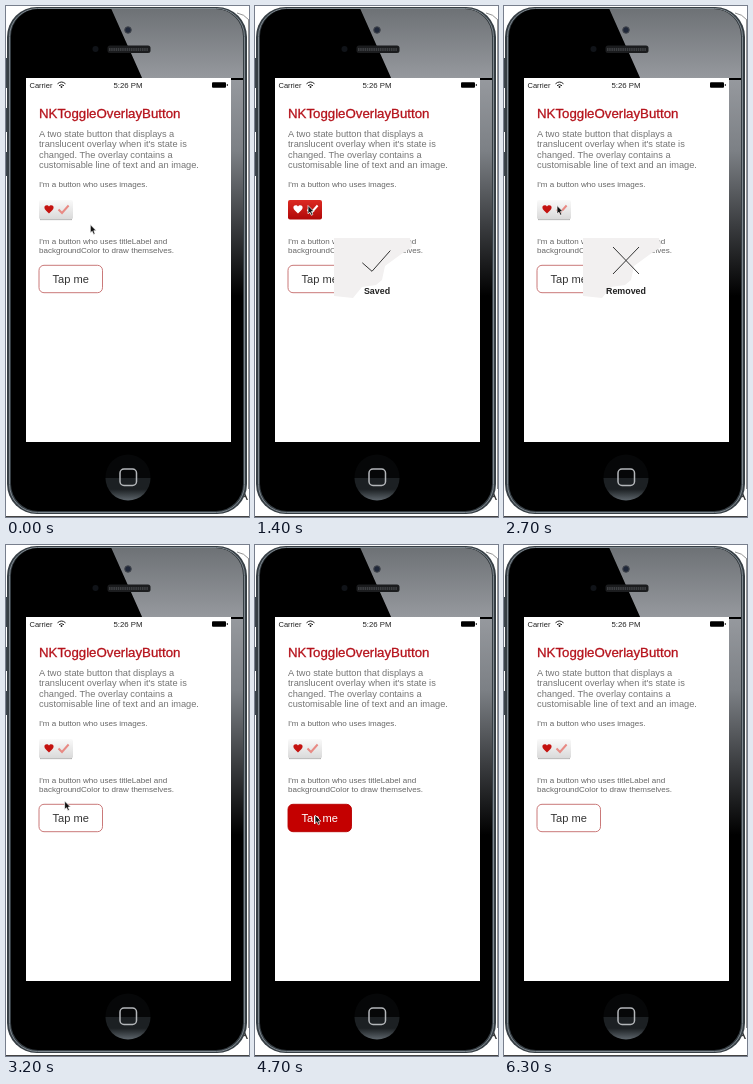
These frames come from a looping animation (243 by 511 pixels, 7300 ms). An HTML page:

```html
<!DOCTYPE html>
<html lang="en">
<head>
<meta charset="utf-8">
<title>Toggle overlay button</title>
<style>
html, body { margin: 0; width: 100%; height: 100%; overflow: hidden; background: #fff; }
svg { display: block; width: 243px; height: 511px; font-family: "Liberation Sans", Arial, sans-serif; }
.status { font-size: 7.5px; fill: #222; }
.title { font-size: 13.25px; fill: #b5121b; stroke: #b5121b; stroke-width: .3px; }
.body { font-size: 9.25px; fill: #747474; }
.note { font-size: 8.05px; fill: #666; }
.tap { font-size: 11.1px; }
.caption { font-size: 8.9px; font-weight: bold; fill: #222; text-anchor: middle; }
.thin { fill: none; stroke: #333; stroke-width: 1; }
.icon { fill: none; stroke-width: 2; }
</style>
</head>
<body>
<svg viewBox="0 0 243 511">
  <defs>
    <linearGradient id="gloss" gradientUnits="userSpaceOnUse" x1="0" y1="0" x2="0" y2="290">
      <stop offset="0" stop-color="#6c7074"/>
      <stop offset=".25" stop-color="#96999e"/>
      <stop offset=".5" stop-color="#7c8085"/>
      <stop offset=".76" stop-color="#3a3c3f"/>
      <stop offset="1" stop-color="#000"/>
    </linearGradient>
    <linearGradient id="home" x2="0" y2="1">
      <stop offset=".5" stop-color="#1c2023"/>
      <stop offset="1" stop-color="#5d656b"/>
    </linearGradient>
    <linearGradient id="plain" x2="0" y2="1">
      <stop offset="0" stop-color="#fafafa"/>
      <stop offset="1" stop-color="#d9d9d9"/>
    </linearGradient>
    <linearGradient id="on" x2="0" y2="1">
      <stop offset="0" stop-color="#dc2a22"/>
      <stop offset="1" stop-color="#b00808"/>
    </linearGradient>
    <linearGradient id="pressed" x2="0" y2="1">
      <stop offset="0" stop-color="#d6d6d6"/>
      <stop offset="1" stop-color="#f6f6f6"/>
    </linearGradient>
    <clipPath id="front"><rect x="5" y="3" width="232" height="502" rx="27"/></clipPath>
  </defs>

  <!-- page edge behind the phone -->
  <path d="M231 7Q238 8 243 14M242.5 14V483" fill="none" stroke="#777" stroke-width=".8"/>
  <text x="232" y="494" font-size="15" fill="#333">A</text>
  <path d="M0 510.5H243" stroke="#444"/>

  <!-- phone -->
  <path d="M1 52V82M1 102V126M1 146V170" stroke="#3d464d" stroke-width="2"/>
  <rect x="1" y="1" width="240" height="507" rx="30" fill="#363e44"/>
  <rect x="3.5" y="2.5" width="235" height="504" rx="28" fill="none" stroke="#7f888f"/>
  <g clip-path="url(#front)">
    <rect width="243" height="511" fill="#000"/>
    <path d="M104 0L137 74H243V0ZM225 72H243V290H225Z" fill="url(#gloss)"/>
  </g>
  <circle cx="122" cy="24" r="3.3" fill="#20283a" stroke="#45494f"/>
  <circle cx="89.5" cy="43" r="3" fill="#101318"/>
  <rect x="101.5" y="39.5" width="43" height="7.5" rx="2.5" fill="#1b1c1e"/>
  <path d="M103 43.5H142" stroke="#3c3e41" stroke-width="3" stroke-dasharray="1.5 .7"/>
  <circle cx="122" cy="471" r="22.5" fill="#060708"/>
  <path d="M99.5 472A22.5 22.5 0 0 0 144.5 472Z" fill="url(#home)"/>
  <rect x="114" y="463" width="16.5" height="16.5" rx="4" fill="none" stroke="#b4b7ba" stroke-width="1.5"/>
  <rect x="20" y="72" width="205" height="364" fill="#fff"/>

  <!-- status bar -->
  <g class="status">
    <text x="23.5" y="81.5">Carrier</text>
    <text x="122" y="81.5" text-anchor="middle" font-size="7.8">5:26 PM</text>
    <path d="M51.5 77.8Q55.5 74.2 59.5 77.8M53 79.7Q55.5 77.5 58 79.7" fill="none" stroke="#222"/>
    <rect x="206" y="76.2" width="14" height="5.6" rx="1" fill="#000"/>
    <path d="M221.3 78V80" stroke="#222"/>
    <circle cx="55.5" cy="81" r=".9"/>
  </g>

  <text class="title" x="33" y="112.3">NKToggleOverlayButton</text>
  <g class="body">
    <text x="33" y="130.5">A two state button that displays a</text>
    <text x="33" y="141.2">translucent overlay when it's state is</text>
    <text x="33" y="151.8">changed. The overlay contains a</text>
    <text x="33" y="162.4">customisable line of text and an image.</text>
  </g>
  <g class="note">
    <text x="33" y="180.8">I'm a button who uses images.</text>
    <text x="33" y="238">I'm a button who uses titleLabel and</text>
    <text x="33" y="246.7">backgroundColor to draw themselves.</text>
  </g>

  <!-- image button -->
  <path id="lip" d="M34 213.6H66" stroke="#999"/>
  <rect id="face" x="33" y="194" width="34" height="19.5" rx="2"/>
  <path id="heart" d="M43 207.6C40.4 205 38.4 203.6 38.4 201.5C38.4 198.8 41.9 198.3 43 200.6C44.1 198.3 47.6 198.8 47.6 201.5C47.6 203.6 45.6 205 43 207.6Z"/>
  <path id="mark" class="icon"/>

  <!-- label button -->
  <rect id="tapBox" x="33" y="259.3" width="63.5" height="27.4" rx="5" stroke-width=".9"/>
  <text id="tapText" class="tap" x="46.5" y="277">Tap me</text>

  <g id="overlay">
    <rect id="panel" x="79" y="232" width="87" height="61" fill="#f2f0f0"/>
    <path id="glyph" class="thin"/>
    <text id="caption" class="caption" x="122" y="288"></text>
  </g>

  <path id="cursor" d="M0 0V8.4L1.9 6.7L3.3 9.8L4.8 9.1L3.5 6.1H6Z" fill="#111" stroke="#fff" stroke-width=".7"/>
</svg>

<script>
const LOOP = 7300, STEP = 100;
const $ = id => document.getElementById(id);
const set = (id, attrs) => {
  for (const name in attrs) $(id).setAttribute(name, attrs[name]);
};

const TICK = 'M107.3 256.8L117 265.3L135.3 244.6';
const CROSS = 'M109 241L135 268M135 241L109 268';
const SMALL_TICK = 'M52.5 203.5L56 207L62.6 199.5';
const SMALL_CROSS = 'M53.5 200L61 208M61 200L53.5 208';

// Overlay appearances: start and end of each, in ms
const popups = [
  { from: 800, to: 1400, text: 'Saved', glyph: TICK },
  { from: 2100, to: 2700, text: 'Removed', glyph: CROSS },
  { from: 3900, to: 4500, text: 'Added', glyph: TICK },
  { from: 5300, to: 5900, text: 'Removed', glyph: CROSS }
];
const fadeIn = [.23, .6, .9, 1];
const growIn = [.82, .94, 1.02, 1];
const fadeOut = [1, .35, 0];
const TORN = 'polygon(0 0, 76px 0, 78px 9px, 66px 17px, 51px 28px, 48px 42px, 42px 47px, 28px 49px, 19px 60px, 0 58px)';

const RED = '#c4120f';
const faces = {
  plain: { fill: 'url(#plain)', heart: RED, mark: '#e88a84', path: SMALL_TICK, lip: 1 },
  on: { fill: 'url(#on)', heart: '#fff', mark: '#fff', path: SMALL_TICK, lip: 0 },
  press: { fill: 'url(#pressed)', heart: RED, mark: RED, path: SMALL_TICK, lip: 0 },
  release: { fill: 'url(#pressed)', heart: RED, mark: RED, path: SMALL_CROSS, lip: 0 }
};

function faceAt(t) {
  if (t < 600 || t >= 2100) return faces.plain;
  if (t < 800) return faces.press;
  return t < 1900 ? faces.on : faces.release;
}

function cursorAt(t) {
  const glide = (start, span, [x0, y0], [x1, y1]) => {
    const p = Math.min(1, Math.max(0, (t - start) / span));
    const e = p * p * (3 - 2 * p);
    return [x0 + (x1 - x0) * e, y0 + (y1 - y0) * e];
  };
  const rest = [53, 199.5];
  return t < 2600 ? glide(0, 300, [84.3, 218.6], rest) : glide(2700, 700, rest, [60, 270]);
}

function drawPopup(t) {
  const p = popups.find(q => t >= q.from && t < q.to + 300);
  set('overlay', { visibility: p ? 'visible' : 'hidden' });
  if (!p) return;
  const leaving = t >= p.to;
  const i = Math.floor((t - (leaving ? p.to : p.from)) / STEP);
  const scale = leaving ? 1 : growIn[i] ?? 1;
  set('overlay', {
    opacity: leaving ? fadeOut[i] : fadeIn[i] ?? 1,
    transform: `translate(122.5 258) scale(${scale}) translate(-122.5 -258)`
  });
  set('glyph', { d: p.glyph });
  $('panel').style.clipPath = leaving ? TORN : 'none';
  $('caption').textContent = p.text;
}

function draw(now) {
  const t = Math.floor(now % LOOP / STEP) * STEP;

  const f = faceAt(t);
  set('face', { fill: f.fill });
  set('heart', { fill: f.heart });
  set('mark', { d: f.path, stroke: f.mark });
  set('lip', { opacity: f.lip });

  const added = t >= 3900 && t < 5300;
  set('tapBox', { fill: added ? '#c40000' : '#fff', stroke: added ? '#b80000' : '#c46a6a' });
  set('tapText', { fill: added ? '#fff' : '#333' });

  drawPopup(t);
  set('cursor', {
    transform: `translate(${cursorAt(t)})`,
    visibility: t < 6300 ? 'visible' : 'hidden'
  });
}

function tick() {
  draw(performance.now());
  requestAnimationFrame(tick);
}
tick();
</script>
</body>
</html>
```
